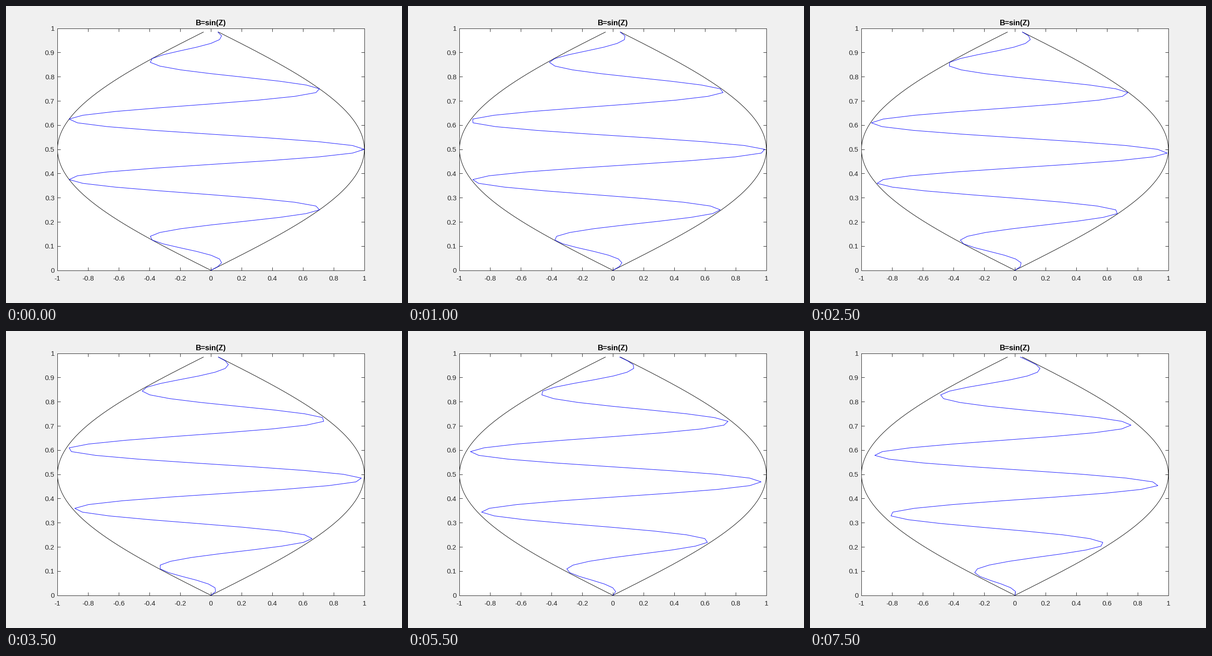
Animation, 864 px wide and 648 px high, one loop 8 s. Source, as a matplotlib script:

```python
import numpy as np
import matplotlib.pyplot as plt
from matplotlib.animation import FuncAnimation

W, H, DPI = 864, 648, 100
FRAMES, INTERVAL = 16, 500
PX = 72 / DPI                     # points per pixel
INK = "#262626"

plt.rcParams["font.family"] = "Liberation Sans"
plt.rcParams["axes.unicode_minus"] = False

fig = plt.figure(figsize=(W / DPI, H / DPI), dpi=DPI, facecolor="#f0f0f0")
ax = fig.add_axes([0.13, 0.11, 0.775, 0.815], facecolor="white")
ax.set(xlim=(-1, 1), ylim=(0, 1))


def label(v):
    return f"{v:.1f}".removesuffix(".0")


x_ticks = np.arange(-5, 6) / 5
y_ticks = np.arange(11) / 10
ax.set_xticks(x_ticks, [label(v) for v in x_ticks])
ax.set_yticks(y_ticks, [label(v) for v in y_ticks])
ax.tick_params(direction="in", top=True, right=True, length=6.7 * PX,
               width=PX, color=INK, labelcolor=INK, labelsize=15 * PX)
ax.tick_params(axis="x", pad=11 * PX)
ax.tick_params(axis="y", pad=6.5 * PX)
for spine in ax.spines.values():
    spine.set(linewidth=PX, color=INK)

fig.text(447.1 / W, 1 - 42 / H, "B=sin(Z)", ha="center", va="baseline",
         fontsize=16.5 * PX, weight="bold", color="black")

z = np.arange(64) / 64
envelope = np.sin(np.pi * z)
for side in (-1, 1):
    ax.plot(side * envelope, z, color="black", lw=0.95 * PX)
wave, = ax.plot([], [], color="blue", lw=0.95 * PX)


def update(n):
    # wave packet travelling down inside the envelope, slowly losing height
    carrier = np.cos(8 * np.pi * z + 0.0725 * n)
    wave.set_data(envelope * carrier * np.cos(0.0221 * n), z)
    return wave,


anim = FuncAnimation(fig, update, frames=FRAMES, interval=INTERVAL,
                     repeat=True, repeat_delay=0)
plt.show()
```
